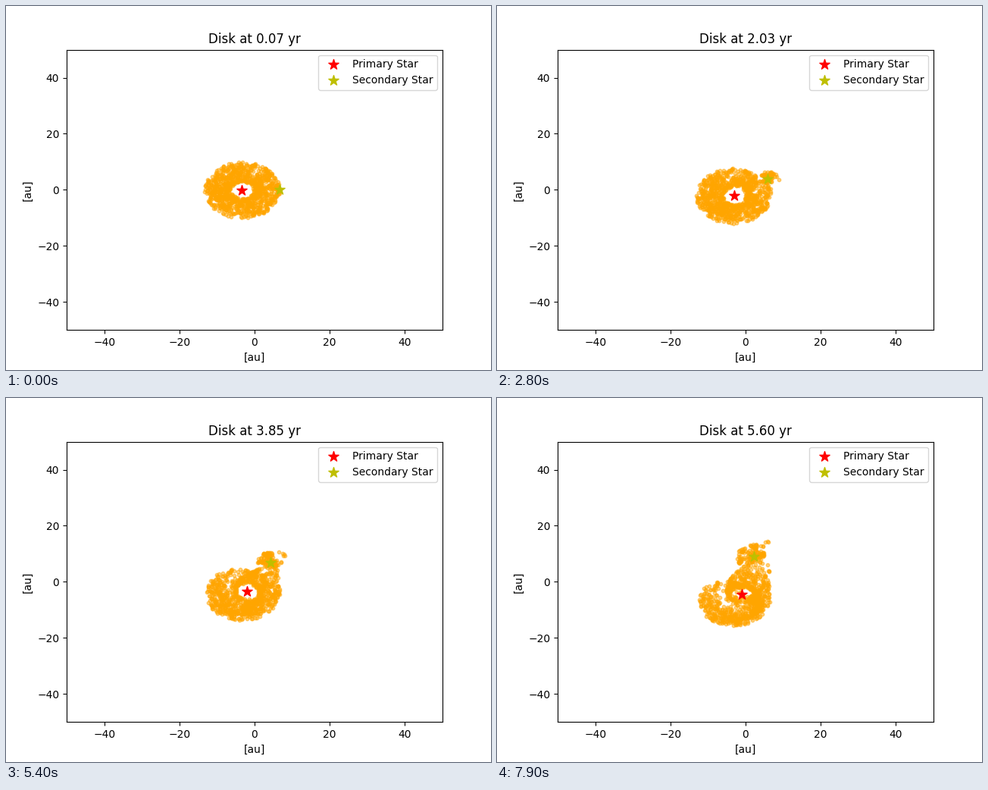
A matplotlib script that plays this animation: 640x480 px, repeating every 8 s.

```python
import numpy as np
import matplotlib.pyplot as plt
from matplotlib.animation import FuncAnimation

FRAMES = 80
STEP = 0.07           # years per frame
SUB = 20              # integration steps per frame
GM = 4 * np.pi ** 2   # au^3 / yr^2 for one solar mass
M1, M2 = 1.0, 0.5
A, ECC = 25.0, 0.6
SOFT = 0.3
N = 1000


def stars(t):
    """Positions of both stars on their Kepler orbit, periapsis at t = 0."""
    mean = np.sqrt(GM * (M1 + M2) / A ** 3) * t
    E = mean / (1 - ECC)
    for _ in range(12):
        E -= (E - ECC * np.sin(E) - mean) / (1 - ECC * np.cos(E))
    sep = A * np.array([np.cos(E) - ECC, np.sqrt(1 - ECC ** 2) * np.sin(E)])
    return -sep * M2 / (M1 + M2), sep * M1 / (M1 + M2)


def pull(pos, t):
    acc = np.zeros_like(pos)
    for mass, star in zip((M1, M2), stars(t)):
        d = star - pos
        r2 = (d ** 2).sum(axis=1, keepdims=True) + SOFT ** 2
        acc += GM * mass * d / r2 ** 1.5
    return acc


def make_disk():
    rng = np.random.default_rng(4)
    r = rng.uniform(3, 10, (N, 1))
    phi = rng.uniform(0, 2 * np.pi, N)
    radial = np.column_stack([np.cos(phi), np.sin(phi)])
    tangent = np.column_stack([-np.sin(phi), np.cos(phi)])
    h = 1e-4
    drift = (stars(h)[0] - stars(-h)[0]) / (2 * h)
    return stars(0)[0] + r * radial, drift + np.sqrt(GM * M1 / r) * tangent


def simulate():
    pos, vel = make_disk()
    dt = STEP / SUB
    acc = pull(pos, 0)
    states = []
    for k in range(1, FRAMES * SUB + 1):
        vel += acc * dt / 2
        pos += vel * dt
        acc = pull(pos, k * dt)
        vel += acc * dt / 2
        if k % SUB == 0:
            states.append(pos.copy())
    return states


disk_states = simulate()

fig, ax = plt.subplots(figsize=(6.4, 4.8), dpi=100)
ax.set(xlim=(-50, 50), ylim=(-50, 50), xlabel="[au]", ylabel="[au]")
title = ax.set_title("")
disk = ax.scatter(*disk_states[0].T, s=10, color="orange", alpha=0.5)
primary = ax.scatter([0], [0], s=100, marker="*", color="r",
                     label="Primary Star", zorder=2)
secondary = ax.scatter([0], [0], s=100, marker="*", color="y",
                       label="Secondary Star", zorder=2)
ax.legend(loc="upper right")


def update(i):
    t = STEP * (i + 1)
    p, s = stars(t)
    disk.set_offsets(disk_states[i])
    primary.set_offsets([p])
    secondary.set_offsets([s])
    title.set_text(f"Disk at {t:.2f} yr")
    return disk, primary, secondary, title


anim = FuncAnimation(fig, update, frames=FRAMES, interval=100,
                     repeat=True, repeat_delay=0)
plt.show()
```
